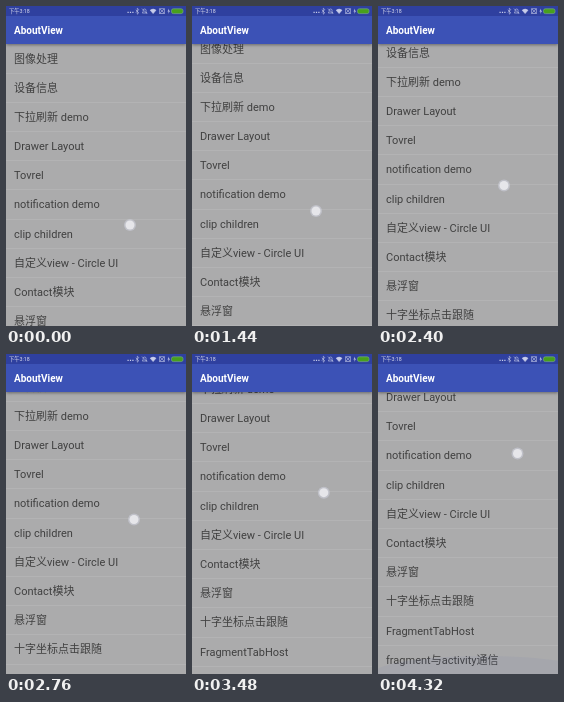
Recreate the animation shown at these times as an HTML page. Size 180x320 px, loop 4.44 s.

```html
<!DOCTYPE html>
<html lang="zh">
<head>
<meta charset="utf-8">
<style>
  html, body { margin: 0; width: 100%; height: 100%; overflow: hidden; }
  body { position: relative; background: #ababac; font-family: Roboto, "Noto Sans CJK SC", "Noto Sans CJK", sans-serif; }
  #list { position: absolute; top: 38.5px; left: 0; width: 180px; margin: 0; padding: 0; list-style: none; }
  #list li { box-sizing: border-box; height: 29.2px; padding-left: 8px; border-bottom: 1px solid #b3b3b4;
    font-size: 11px; line-height: 29px; color: #404040; white-space: nowrap; }
  header { position: absolute; top: 0; left: 0; width: 180px; height: 38px; color: #fff;
    background: linear-gradient(#2f409f 10px, #3c52b6 10px); box-shadow: 0 1px 3px rgba(0, 0, 0, .4); }
  time { position: absolute; left: 3px; top: 1px; font-size: 5.3px; line-height: 8px; color: #dde; }
  h1 { position: absolute; left: 8px; top: 11px; margin: 0; font-size: 10px; line-height: 28px; font-weight: 600; }
  svg { position: absolute; top: 0; left: 0; }
</style>
</head>
<body>
<ul id="list"></ul>
<header><time>下午3:18</time><h1>AboutView</h1></header>
<svg width="180" height="320">
  <g fill="none" stroke="#c8cdea" stroke-width=".6">
    <path d="M121.5 6.4h6" stroke-width="1.2" stroke-dasharray="1.2 1.2"/>
    <path d="M129.8 3.8l3 3-1.500 1.400v-6l1.500 1.400-3 3"/>
    <path d="M136.300 7h4.600l-.8-1.200v-1.300a1.500 1.500 0 0 0-3 0v1.300zM136 2.600l5.200 5.200"/>
    <path d="M144.200 4.200q2.900-2.200 5.800 0L147.100 7.600z" fill="#c8cdea"/>
    <path d="M153.600 2.700h4.800v4.800h-4.800zl4.800 4.800m0-4.800l-4.800 4.800"/>
    <rect x="165.500" y="2.800" width="11.500" height="4.800" rx="1.800" fill="#48a01c" stroke="#7fae88"/>
  </g>
  <path d="M163 2.500l-1.500 3h1.200l-.5 2.500 1.800-3.200h-1.200z" fill="#c8cdea"/>
  <ellipse id="glow" cx="105" cy="320" rx="110" fill="#3f51b5" fill-opacity=".05"/>
  <g id="touch">
    <circle r="6" fill="#d4d6e4" fill-opacity=".5"/>
    <circle r="4.5" fill="#e6e6ea"/>
  </g>
</svg>
<script>
const $ = id => document.getElementById(id);
const LOOP = 4440, STEP = 120, START = 840, SLOP = 4.5, MAX_SCROLL = 97;
const items = ['图像处理', '设备信息', '下拉刷新 demo', 'Drawer Layout', 'Tovrel', 'notification demo',
  'clip children', '自定义view - Circle UI', 'Contact模块', '悬浮窗', '十字坐标点击跟随',
  'FragmentTabHost', 'fragment与activity通信'];

// Finger path: time, x, y
const path = [[START, 124, 219], [1440, 124, 205], [1920, 124.5, 193.5], [2400, 126, 179.5],
  [3120, 130, 151.5], [3720, 133, 130.1], [4320, 139.5, 99.5]];

for (const text of items) {
  const row = document.createElement('li');
  row.textContent = text;
  $('list').append(row);
}

function fingerAt(t) {
  if (t <= START) return path[0].slice(1);
  const i = path.findIndex(p => p[0] >= t);
  const [t0, x0, y0] = path[i - 1], [t1, x1, y1] = path[i];
  const k = (t - t0) / (t1 - t0);
  return [x0 + (x1 - x0) * k, y0 + (y1 - y0) * k];
}

function draw(now) {
  const t = Math.floor(now % LOOP / STEP) * STEP;
  const [x, y] = fingerAt(t);
  const pull = Math.max(0, path[0][2] - y - SLOP);

  $('list').style.transform = `translateY(${-Math.round(Math.min(pull, MAX_SCROLL))}px)`;
  $('glow').setAttribute('ry', Math.max(0, pull - MAX_SCROLL));
  $('touch').setAttribute('transform', `translate(${x} ${y})`);
  requestAnimationFrame(draw);
}
requestAnimationFrame(draw);
</script>
</body>
</html>
```
